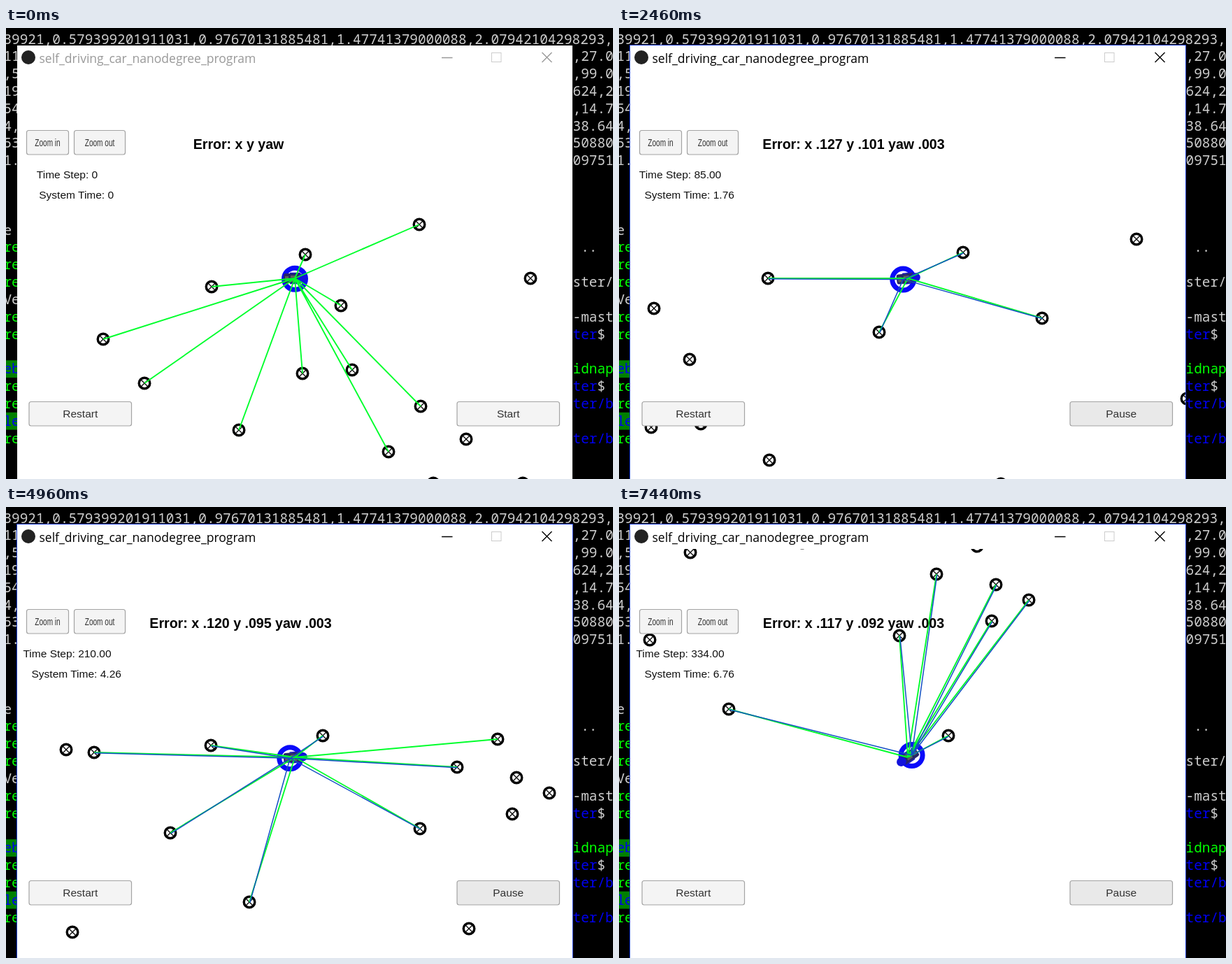
Recreate the animation shown at these times as an HTML page. Size 868 by 645 pixels, loop 8000 ms.

```html
<!DOCTYPE html>
<html lang="en">
<head>
<meta charset="utf-8">
<title>Particle filter simulator</title>
<style>
  html, body { margin: 0; width: 100%; height: 100%; overflow: hidden; background: #000; }
  svg { display: block; width: 868px; height: 645px; }
  .mono { font: 19.38px "Noto Sans Mono", "DejaVu Sans Mono", monospace; }
  .title { font: 17.5px "Open Sans", "Noto Sans", sans-serif; }
  .ui { font: 15.5px "Liberation Sans", Arial, sans-serif; text-anchor: middle; }
  .small { font-size: 14px; }
  .error { font-size: 19.6px; font-weight: bold; }
</style>
</head>
<body>
<svg viewBox="0 0 868 645">
  <defs>
    <clipPath id="view"><rect x="16" y="60" width="794" height="585"/></clipPath>
    <g id="mark">
      <circle r="7.8" fill="#fff" stroke="#000" stroke-width="3.4"/>
      <path d="M-5 -5L5 5M5 -5L-5 5" stroke="#000" stroke-width="1.3"/>
    </g>
  </defs>
  <rect width="868" height="645" fill="#000"/>
  <g id="terminal" class="mono"></g>

  <rect x="16" y="25" width="794" height="630" fill="#fff"/>
  <rect id="border" x="15.5" y="24.5" width="795" height="640" fill="none" stroke="#1c3fd6"/>
  <circle cx="32" cy="42" r="10" fill="#222"/>
  <g id="chrome">
    <text class="title" x="47.5" y="49.5" fill="currentColor">self_driving_car_nanodegree_program</text>
    <path d="M623 42.5H638.5M766.5 35L780.5 49M780.5 35L766.5 49" stroke="currentColor" stroke-width="1.4" fill="none"/>
  </g>
  <rect x="694.5" y="35.5" width="13.5" height="13" fill="none" stroke="#ccc"/>

  <g clip-path="url(#view)">
    <g id="marks"></g>
    <circle id="ring" r="15.5" fill="none" stroke="#0a0afa" stroke-width="7"/>
    <g id="car">
      <rect x="-16" y="-7" width="26" height="14" rx="3" fill="#26266a"/>
      <ellipse cx="11" rx="7" ry="6.5" fill="#1212dc"/>
      <path d="M-14 -3H-9V4H-14ZM-6 -4H2V-1H-6ZM-5 2H3V5H-5Z" fill="#60605c"/>
      <path d="M-7 -7.5H8M-7 7.5H8" stroke="#1818c0" stroke-width="1.5"/>
    </g>
    <path id="green" stroke="#00ff2c" stroke-width="1.9" fill="none"/>
    <path id="blue" stroke="#1250c4" stroke-width="1.5" fill="none"/>
  </g>

  <g id="buttons"></g>
  <g class="ui" fill="#111">
    <text id="step" x="87.5" y="214.5"></text>
    <text id="clock" x="100.7" y="244"></text>
    <text id="error" class="error" y="173" fill="#000"></text>
  </g>
  <path id="cursor" d="M743 560V585.5L749 580L753 588.5L757 586.5L753 578.5H761Z" fill="#fff" stroke="#000" stroke-width="1.1"/>
</svg>
<script>
const $ = id => document.getElementById(id);
const LOOP = 8000, TICK = 620, RANGE = 295, CAR = [413, 358];

// Landmarks on the map
const marks = [
  [591, 281], [428, 324], [294, 370], [139, 445], [198, 508], [333, 575],
  [424, 494], [479, 397], [495, 489], [593, 541], [658, 588], [547, 606],
  [750, 358], [611, 651], [739, 651], [870, 244], [983, 338], [1118, 225],
  [1190, 453], [924, 575], [1274, 316], [1391, 198], [1431, 202], [1400, 459],
  [1540, 317], [1598, 192], [1758, 178], [1653, 416], [1897, 311], [1950, 223],
  [2008, 183], [2035, 238], [2082, 260], [2029, 290], [1967, 454]
];

// Key points of the drive: tick, map shift x, y
const route = [
  [1, 0, 0], [2, -66.3, 20.7], [4, -378, 77], [6, -815, 111.5], [8, -1305, 149],
  [9, -1500, 159], [10, -1609, 97], [11, -1614, -40], [12, -1496, -127]
];

// Smooth curve through the route
function shiftAt(k) {
  const last = route.length - 1;
  k = Math.min(Math.max(k, route[0][0]), route[last][0]);
  const i = Math.min(route.findLastIndex(p => p[0] <= k), last - 1);
  const a = route[i], b = route[i + 1], h = b[0] - a[0], u = (k - a[0]) / h;
  const slope = (j, c) => {
    const p = route[Math.max(j - 1, 0)], q = route[Math.min(j + 1, last)];
    return (q[c] - p[c]) / (q[0] - p[0]);
  };
  return [1, 2].map(c => {
    const ease = u * u * (3 - 2 * u);
    return a[c] + (b[c] - a[c]) * ease +
      h * u * (1 - u) * ((1 - u) * slope(i, c) - u * slope(i + 1, c));
  });
}

function headingAt(k) {
  const [x0, y0] = shiftAt(k - .1), [x1, y1] = shiftAt(k + .1);
  return Math.atan2(y0 - y1, x0 - x1);
}

// Start-up error dies out fast, then a slow swell passes
function errorsAt(k) {
  const settle = Math.exp(-3 * (k - 2));
  const swell = Math.exp(-((k - 5.2) ** 2) / 6.2);
  return [117 + 12.1 * swell - 8.3 * settle, 92 + 11.7 * swell + 62.8 * settle]
    .map(v => '.' + String(Math.round(v)).padStart(3, '0'));
}

function buildTerminal() {
  const grey = '#ccc', lime = '#00ff00', navy = '#0000f0';
  let out = '';
  const put = (col, row, text, fill = grey, bg) => {
    const x = col * 11.63 - 3.5, y = 22.5 + row * 24.83;
    if (bg) out += `<rect x="${x}" y="${y - 19}" width="24" height="24.8" fill="${bg}"/>`;
    out += `<text x="${x}" y="${y}" fill="${fill}">${text}</text>`;
  };
  put(0, 0, '39921,0.579399201911031,0.97670131885481,1.47741379000088,2.07942104298293,');
  ['11', ',5', '19', '54', '4,', '53', '1.'].forEach((s, i) => put(0, i + 1, s));
  [',27.0', ',99.0', '624,2', ',14.7', '38.64', '50880', '09751'].forEach((s, i) => put(70, i + 1, s));
  put(0, 11, 'e');
  put(0, 15, 'Ve');
  [12, 13, 14, 16, 17, 20, 21, 23].forEach(row => put(0, row, 're', lime));
  put(0, 19, 'eb', navy, '#008000');
  put(0, 22, 'le', navy, '#008000');
  put(71, 12, '..');
  put(70, 14, 'ster/');
  put(70, 16, '-mast');
  put(70, 19, 'idnap', lime);
  [17, 20].forEach(row => { put(70, row, 'ter', navy); put(73, row, '$'); });
  [21, 23].forEach(row => put(70, row, 'ter/b', navy));
  $('terminal').innerHTML = out;
}

function button(id, x, y, w, label, small) {
  return `<rect id="${id}Box" x="${x}" y="${y}" width="${w}" height="34.5" rx="3" fill="#f4f4f4" stroke="#a3a3a3" stroke-width="1.2"/>
    <text id="${id}Label" class="ui ${small ? 'small' : ''}" fill="#323232"
      transform="translate(${x + w / 2} ${y + 22.7}) scale(${small ? .72 : 1} 1)">${label}</text>`;
}

function rays(from, points, drift = 0) {
  return points
    .filter(([x, y]) => Math.hypot(x - from[0], y - from[1]) < RANGE)
    .map(([x, y]) => `M${from}L${x + drift} ${y + drift}`).join('');
}

let shown = -1;
function draw(time) {
  const k = Math.floor((time + 20) / TICK);
  if (k === shown) return;
  shown = k;
  const active = k > 0, running = k > 1;
  const [sx, sy] = shiftAt(k), heading = headingAt(k);
  const points = marks.map(([x, y]) => [x + sx, y + sy]);

  // The estimate trails the car by a lag that beats with the ticks
  const lag = running ? 6.8 * Math.abs(Math.sin((k - 2) * Math.PI / 4)) : 0;
  const guess = [CAR[0] - lag * Math.cos(heading), CAR[1] + .8 - lag * Math.sin(heading)];

  $('marks').innerHTML = points
    .map(([x, y]) => `<use href="#mark" x="${x}" y="${y}"/>`).join('');
  $('green').setAttribute('d', rays(CAR, points));
  $('blue').setAttribute('d', running ? rays(guess, points, .8) : '');
  $('ring').setAttribute('transform', `translate(${guess})`);
  $('car').setAttribute('transform', `translate(${CAR}) rotate(${heading * 180 / Math.PI})`);

  const step = Math.floor(23.5 + 31.1 * (k - 2));
  const clock = .02 * Math.floor(1.007 * step + 2.45);
  const [ex, ey] = errorsAt(k);
  $('step').textContent = 'Time Step: ' + (running ? step.toFixed(2) : 0);
  $('clock').textContent = 'System Time: ' + (running ? clock.toFixed(2) : 0);
  $('error').textContent = running ? `Error: x ${ex} y ${ey} yaw .003` : 'Error: x y yaw';
  $('error').setAttribute('x', running ? 335.5 : 332.5);

  $('toggleLabel').textContent = running ? 'Pause' : 'Start';
  $('toggleBox').setAttribute('fill', active ? '#e9e9e9' : '#f4f4f4');
  $('chrome').style.color = active ? '#000' : '#999';
  $('border').style.display = active ? '' : 'none';
  $('cursor').style.display = k === 1 || k === 2 ? '' : 'none';
}

buildTerminal();
$('buttons').innerHTML =
  button('in', 29.5, 146.5, 60, 'Zoom in', true) +
  button('out', 97.5, 146.5, 73, 'Zoom out', true) +
  button('restart', 33, 534.5, 146.5, 'Restart') +
  button('toggle', 645, 534.5, 146.5, 'Start');

const start = performance.now();
function tick() {
  draw((performance.now() - start) % LOOP);
  requestAnimationFrame(tick);
}
tick();
</script>
</body>
</html>
```
